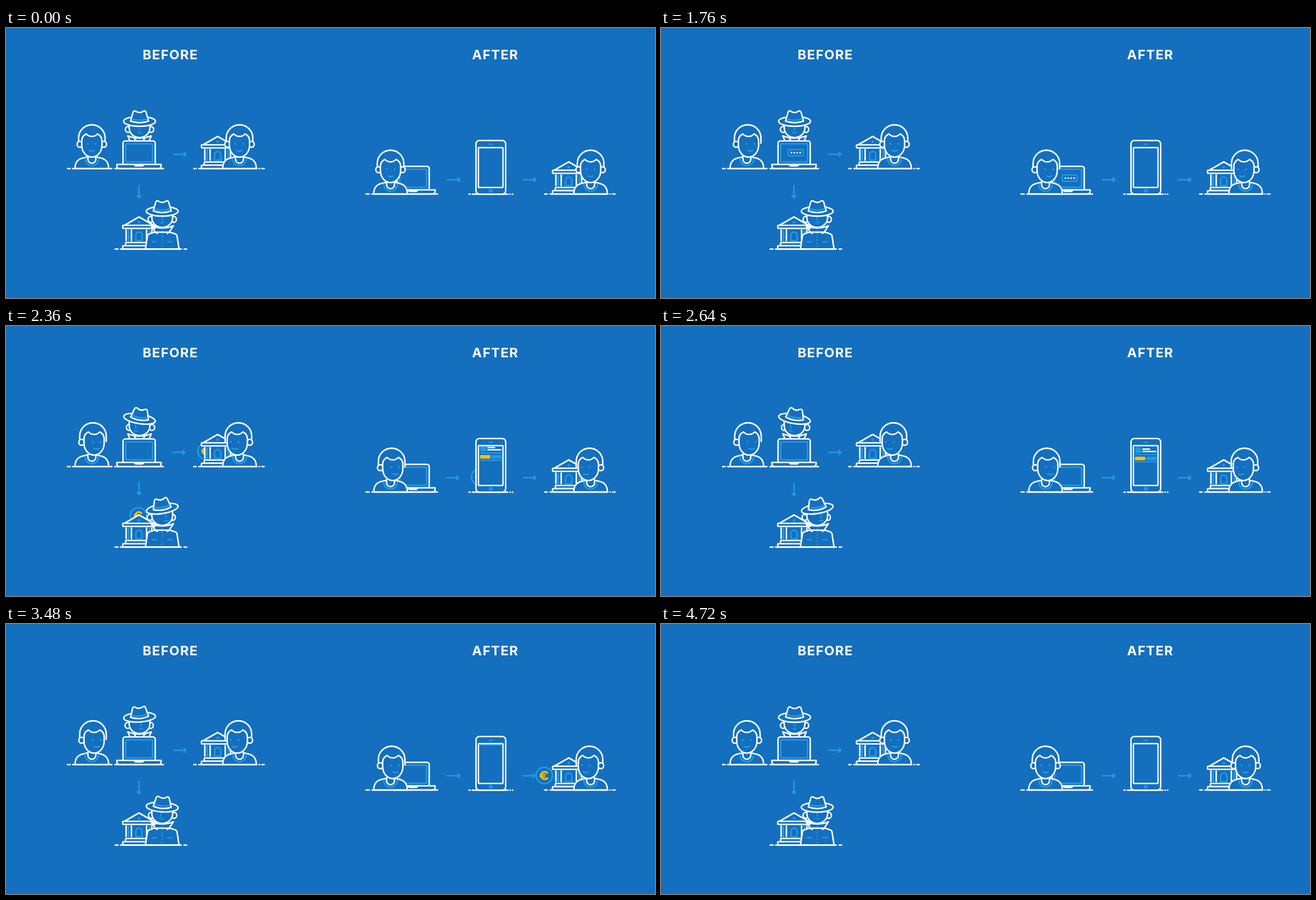
An HTML page with a canvas for the animation above (5.04 s loop, 1159x483 px).

```html
<!DOCTYPE html>
<html lang="en">
<head>
<meta charset="utf-8">
<title>Before and after</title>
<style>
html, body { margin: 0; height: 100%; overflow: hidden; background: #146fbe; }
canvas { display: block; }
</style>
</head>
<body>
<canvas id="stage" width="1159" height="483"></canvas>
<script>
const c = document.getElementById('stage').getContext('2d');
const BG = '#146fbe', WHITE = '#fff', BLUE = '#209be6', GOLD = '#ffbe0b';
const LOOP = 5040, STEP = 40;

// Progress from 0 to 1 between times a and b
const linear = (t, a, b) => Math.min(1, Math.max(0, (t - a) / (b - a)));
function ramp(t, a, b) {
  const p = linear(t, a, b);
  return p < .5 ? 4 * p ** 3 : 1 - 4 * (1 - p) ** 3;
}
const mix = (a, b, p) => a + (b - a) * p;
const blink = (t, ...times) =>
  Math.min(1, ...times.map(m => Math.max(.2, Math.abs(t - m) / 100)));

function at(x, y, draw, angle = 0) {
  c.save();
  c.translate(x, y);
  c.rotate(angle);
  draw();
  c.restore();
}
function paint(p, stroke, fill, width) {
  if (fill) { c.fillStyle = fill; c.fill(p); }
  if (stroke) { c.strokeStyle = stroke; c.lineWidth = width; c.stroke(p); }
}
function path(d, stroke = WHITE, fill, width = 2.6) {
  paint(new Path2D(d), stroke, fill, width);
}
function box(x, y, w, h, r, stroke, fill, width = 2.6) {
  const p = new Path2D();
  p.roundRect(x, y, w, h, r);
  paint(p, stroke, fill, width);
}
function oval(x, y, rx, ry, stroke, fill) {
  const p = new Path2D();
  p.ellipse(x, y, rx, ry, 0, 0, 7);
  paint(p, stroke, fill, 2.6);
}
function ground(y, ...spans) {
  for (const [a, b] of spans) path(`M${a} ${y}H${b}`);
}

function person(x, y, turn, open) {
  at(x, y, () => {
    path('M-30 0C-30 -11 -25 -17 -16 -19L-7 -21H7L16 -19C25 -17 30 -11 30 0Z', WHITE, BG);
    path('M-12 -18C-12 -1 12 -1 12 -18', BLUE);
    path('M-7 -22V-16.5A7 7 0 0 0 7 -16.5V-22', WHITE, BG);

    const hx = 2 * turn;
    const left = -47 + 2 * Math.max(0, -turn), right = -47 + 2 * Math.max(0, turn);
    path(`M${hx - 23.7} ${left}V-54.7A23.7 23.7 0 0 1 ${hx + 23.7} -54.7V${right}`, WHITE, BG);
    for (const s of [-1, 1])
      oval(s * 21.3 + turn * (s * turn > 0 ? -7 : 3), -43.5, 5, 5.3, WHITE, BG);

    at(4 * turn, 0, () => path('M-18 -50C-18 -56 -14 -60 -10 -62Q-6 -57.5 0 -57.5Q6 -57.5 10 -62' +
      'C14 -60 18 -56 18 -50V-42C18 -29 9 -20.5 0 -20.5S-18 -29 -18 -42Z', WHITE, BG));
    at(8.5 * turn, 0, () => {
      for (const s of [-7, 7]) oval(s, -44.3, 1.7, 1.7 * open, null, BLUE);
      path('M-4.5 -32.4Q0 -30 4.5 -32.4', BLUE, null, 2.4);
    });
  });
}

function spy(x, y, turn, coat) {
  at(x, y, () => {
    if (coat) {
      path('M-30 68L-26.5 45Q-26 42 -23 41L-14 38H14L23 41Q26 42 26.5 45L30 68Z', WHITE, BG);
      for (let i = 0; i < 6; i++) oval(0, 35 + i * 5.6, 1.3, 1.3, null, BLUE);
      path('M-18 55H-10M10 55H18', BLUE, null, 2.2);
    }
    for (const s of [-1, 1]) oval(s * 20.5 - 1.8 * turn, 15, 4.8, 5.3, WHITE, BG);
    path('M-18.5 4V12C-18.5 22 -10 29.5 0 29.5S18.5 22 18.5 12V4Z', WHITE, BG);
    path(coat
      ? 'M-20 26.5Q-11 30.5 0 30.5Q11 30.5 20 26.5L12 38.5L9 40M-20 26.5L-12 38.5L-9 40'
      : 'M-21 26.5Q-10 30.5 0 30.5Q10 30.5 21 26.5L16 38H-16ZM-10 30L-5 37M10 30L5 37',
      WHITE, coat ? null : BG);
    at(7 * turn, 0, () => path('M0 10.5V17M-3 21H3', BLUE, null, 2));
    at(0, -Math.abs(turn), () => {
      oval(0, .5, 28.5, 8.7, WHITE, BG);
      path('M-16 0L-11.7 -15.5Q-10.5 -19.5 -6.5 -17.5Q0 -13 6.5 -17.5Q10.5 -19.5 11.7 -15.5L16 0' +
        'Q0 6 -16 0Z', WHITE, BG);
      path('M-13 -3.5Q0 .5 13 -3.5', BLUE);
    }, -turn * .16);
  });
}

function bank(x, y) {
  at(x, y, () => {
    c.fillStyle = BG;
    c.fillRect(-23, -38, 46, 30);
    path('M-27 -42L0 -57.5L27 -42Z', WHITE, BG);
    oval(0, -48, 2.3, 2.3, null, BLUE);
    box(-29, -42.5, 58, 5.5, 1, WHITE, BG);
    for (const s of [-1, 1]) {
      path(`M${s * 23} -34V-15M${s * 13.5} -34V-15`);
      path(`M${s * 18.8} -33V-15`, BLUE, null, 3);
    }
    path('M-5.5 -15V-25A5.5 5.5 0 0 1 5.5 -25V-15Z', BLUE);
    box(-24, -11.7, 48, 5.5, 1, WHITE, BG);
    box(-29, -6, 58, 6, 1, WHITE, BG);
  });
}

function laptop(x, y, t) {
  at(x, y, () => {
    box(-28.5, -49.5, 57.5, 43, 4, WHITE, BG);
    box(-23.7, -44.3, 48, 32.3, 1, BLUE);
    path('M-39.5 -7.5H39.5V-5Q39.5 0 34 0H-34Q-39.5 0 -39.5 -5Z', WHITE, BG);
    path('M-9.5 -7.5H9.5Q9 -3.5 5 -3.5H-5Q-9 -3.5 -9.5 -7.5Z', null, WHITE);

    const grow = ramp(t, 240, 680);
    if (grow && t < 1920) {
      c.save();
      c.beginPath();
      c.rect(-22.5, -43, 45.5, 30);
      c.clip();
      c.translate(40 * linear(t, 1640, 1920) ** 3, -28.5);
      box(-13.3 * grow, -5.6 * grow, 26.6 * grow, 11.2 * grow, .5, BLUE, null, 2.2);
      for (let i = 0; i < 4; i++) {
        const r = 1.6 * linear(t, 800 + i * 120, 880 + i * 120);
        if (r) oval(-7.7 + i * 5.2, 0, r, r, null, WHITE);
      }
      c.restore();
    }
  });
}

function arrow(x, y, shift, angle = 0) {
  at(x, y, () => at(shift, 0, () => path('M0 0H22M18.7 -3.3L22 0L18.7 3.3', BLUE)), angle);
}

function coin(x, y) {
  at(x, y, () => {
    oval(0, 0, 14.6, 14.6, BLUE, BG);
    const p = new Path2D();
    p.arc(.8, 0, 6.6, .8, 2 * Math.PI - .8);
    paint(p, GOLD, null, 3.2);
    path('M-7.5 -1.7H2M-7.5 1.7H1', GOLD, null, 2.2);
  });
}

function phone(t) {
  box(839.3, 201.3, 53, 96, 6, WHITE, BG);
  path('M862.5 208H869', BLUE, null, 2.2);
  oval(865.7, 291.3, 2.3, 2.3, BLUE);
  const enter = 1 - (1 - linear(t, 2120, 2550)) ** 3;
  const show = enter - ramp(t, 3280, 3600);
  if (show > 0) {
    c.save();
    c.beginPath();
    c.rect(844, 214, 43, 71);
    c.clip();
    c.translate(0, -34 * (1 - show));
    box(847, 217, 10.5, 10.5, 2, null, BLUE);
    path('M860.5 220.3H872.5M860.5 224.5H883.5', WHITE, null, 2.4);
    path('M847 230H884.5M847 243H884.5', BLUE, null, 2.2);
    box(846.5, 233.7, 18.5, 6.6, 1.5, null, GOLD);
    box(866.7, 233.7, 18.5, 6.6, 1.5, null, BLUE);
    c.restore();
  }
  box(843.7, 214, 43.8, 71.3, 1, WHITE, null, 2.4);
}

function title(text, x) {
  c.font = '700 23.5px Inter, sans-serif';
  c.letterSpacing = '1.3px';
  c.textAlign = 'center';
  c.fillStyle = WHITE;
  c.fillText(text, x, 56.3);
}

function draw(t) {
  c.fillStyle = BG;
  c.fillRect(0, 0, 1159, 483);
  c.lineCap = c.lineJoin = 'round';
  title('BEFORE', 293.6);
  title('AFTER', 873.9);

  const send = ramp(t, 1960, 2560), forward = ramp(t, 3160, 3720);
  const nudge = -2.2 * Math.sin(Math.PI * linear(t, 2120, 2600));
  const nudge2 = -2.2 * Math.sin(Math.PI * linear(t, 3280, 3720));
  arrow(299.3, 226, nudge);
  arrow(237.5, 281.5, nudge, Math.PI / 2);
  arrow(788.5, 271.5, nudge);
  arrow(924, 271.5, nudge2);

  if (send > 0 && send < 1) {
    coin(mix(238, 378, send), 224);
    coin(236.5, mix(222, 360, send));
    coin(mix(730, 866, send), 270);
  }
  if (forward > 0 && forward < 1) coin(mix(866, 1005, forward), 271);

  const glance = -ramp(t, 1960, 2280) + 2 * ramp(t, 2640, 2960) - ramp(t, 3240, 3680);
  const turn = ramp(t, 1520, 1920);
  const turnAfter = turn - ramp(t, 4080, 4600);

  person(153.3, 251.5, turn - ramp(t, 3480, 3960), blink(t, 460, 3030));
  spy(238.5, 166.5, glance, false);
  laptop(237.5, 251.5, t);
  ground(251.5, [110, 114.5], [119, 189], [194.5, 281]);

  bank(378, 251.5);
  person(417, 251.5, ramp(t, 3800, 4280) - ramp(t, 1960, 2320), blink(t, 460, 1000, 3030, 4620));
  ground(251.5, [335.5, 339.5], [344.5, 448], [452, 453], [457, 461]);

  bank(237.5, 395.5);
  spy(279, 327.3, -glance, true);
  ground(395.5, [195, 200], [204.5, 313], [318, 322.5]);

  laptop(726.8, 297, t);
  person(686.7, 297, turnAfter, blink(t, 460, 3030));
  ground(297, [643, 648.5], [653.5, 770.5]);

  phone(t);
  ground(297.3, [827, 829], [833, 896], [900, 900.5], [904.5, 905]);

  bank(1005, 297);
  person(1044, 297, -turnAfter, blink(t, 460, 3030));
  ground(297, [962, 966.5], [971.5, 1075], [1079, 1079.5], [1083.5, 1087.5]);
}

const start = performance.now();
function tick() {
  const t = (performance.now() - start) % LOOP;
  draw(Math.floor(t / STEP) * STEP);
  requestAnimationFrame(tick);
}
tick();
</script>
</body>
</html>
```
